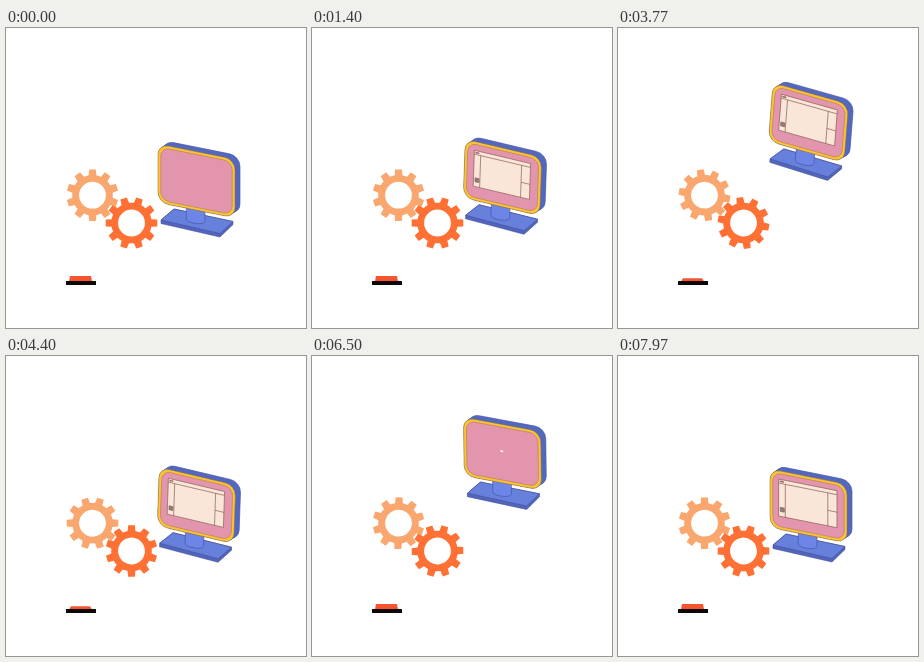
These frames come from a looping animation (300 by 300 pixels, 8000 ms). An HTML page:

```html
<!DOCTYPE html>
<html lang="en">
<head>
<meta charset="utf-8">
<title>Monitor and gears</title>
<style>
  html, body { margin: 0; width: 100%; height: 100%; overflow: hidden; background: #fff; }
  svg { display: block; width: 100vw; height: 100vh; }
</style>
</head>
<body>
<svg viewBox="0 0 300 300">
  <path id="lightGear" fill="#f9a76e" fill-rule="evenodd"/>
  <path id="darkGear" fill="#ff7034" fill-rule="evenodd"/>

  <path id="button" fill="#f5542f"/>
  <rect x="60" y="253" width="30" height="4" fill="#0c0805"/>

  <g id="monitor" stroke-linejoin="round">
    <g stroke="#46509a" stroke-width=".6">
      <path fill="#5065bb" d="M155 189L168 178L227 190.5V193.5L214 206L155 192.5Z"/>
      <path fill="#6780dc" d="M155 189L168 178L227 190.5L214 202.5Z"/>
      <path fill="#6c85e6" d="M180.3 170V188Q181 191.500 190 192.500Q198.500 193.500 199 190V174Z"/>
    </g>
    <g transform="matrix(1 .2 0 1 152 113)">
      <g id="shell" fill="#5368bf"></g>
      <rect width="77" height="58.500" rx="10.500" fill="#fcc52f" stroke="#8a6a4c" stroke-width=".5"/>
      <rect x="2.800" y="2.800" width="71.400" height="52.900" rx="8.500" fill="#e295ad" stroke="#b98262" stroke-width=".7"/>
      <g id="window" fill="none" stroke="#8d6257" stroke-width=".7">
        <rect x="-29.200" y="-18.500" width="58.400" height="37" fill="#fae6d9"/>
        <path d="M-29.200 -14.500H29.200M-22.500 -14.500V18.500M20 -14.500V18.500M20 3H29.200"/>
        <path d="M-28 -16.500h4" stroke-width="1.400"/>
        <rect x="-27.500" y="9.500" width="4" height="4" fill="#8d7f80"/>
      </g>
    </g>
  </g>
</svg>
<script>
const LOOP = 8000, JUMP = 3000;
const $ = id => document.getElementById(id);

// Rows: time, x, y, rotation
const pose = [
  [0, 0, 3, 0], [45, -1, 4, -7], [100, -2.7, 0, -16], [200, -3, -17, -14],
  [350, -1, -42, -6], [530, 0, -53, 0], [800, 0, -55.5, 5], [1000, 1, -57.5, 9],
  [1150, 1, -56, 10], [1270, 1, -46, 10], [1400, 0, -.5, 2], [1530, 0, -12, 0],
  [1670, 0, 0, 0], [2880, 0, 0, 0], [3000, 0, 3, 0]
];
const windowScale = [
  [0, 0], [450, 0], [800, 1], [1000, 1.02], [1400, .97], [1970, 1],
  [2470, 1], [2725, 1], [2770, .88], [2940, 0], [3000, 0]
];
const gearTurn = [[0, 0], [2400, 0], [3100, 2], [4400, 18], [5770, 29], [6900, 36], [8000, 36]];
const press = [[0, 0], [2700, 0], [3100, 1], [3900, 2.3], [4400, 2.3], [5200, .8], [5700, 0], [8000, 0]];

// Smooth interpolation that never overshoots its keys
function sample(keys, t, col = 1) {
  const last = keys.length - 1;
  let i = 0;
  while (i < last - 1 && t >= keys[i + 1][0]) i++;
  const slope = k => k < 0 || k >= last ? 0 :
    (keys[k + 1][col] - keys[k][col]) / (keys[k + 1][0] - keys[k][0]);
  const tangent = k => {
    const a = slope(k - 1), b = slope(k);
    return a * b > 0 ? 2 * a * b / (a + b) : 0;
  };
  const span = keys[i + 1][0] - keys[i][0];
  const u = (t - keys[i][0]) / span, v = 1 - u;
  return keys[i][col] * v * v * (1 + 2 * u) + keys[i + 1][col] * u * u * (3 - 2 * u)
    + span * u * v * (tangent(i) * v - tangent(i + 1) * u);
}

function gearPath(offset) {
  const root = 20.3, tip = 26, hole = 13.4, points = [];
  const add = (r, deg) => {
    const a = deg * Math.PI / 180;
    points.push((r * Math.cos(a)).toFixed(2) + ' ' + (r * Math.sin(a)).toFixed(2));
  };
  for (let k = 0; k < 10; k++) {
    const mid = k * 36 + offset;
    add(root, mid - 18);
    add(root, mid - 11);
    add(tip, mid - 7.5);
    add(tip, mid + 7.5);
    add(root, mid + 11);
  }
  return `M${points.join('L')}ZM${hole} 0A${hole} ${hole} 0 1 0 ${-hole} 0A${hole} ${hole} 0 1 0 ${hole} 0Z`;
}

function buildShell() {
  const steps = 8;
  let rects = '';
  for (let k = steps; k >= 0; k--) {
    const x = 5 * k / steps, y = -4.5 * k / steps;
    const edge = k === steps ? ' stroke="#46509a" stroke-width=".6"' : '';
    rects += `<rect x="${x}" y="${y}" width="77" height="58.5" rx="10.5"${edge}/>`;
  }
  $('shell').innerHTML = rects;
}

function draw(time) {
  const t = time % LOOP, phase = t % JUMP;
  const [x, y, turn] = [1, 2, 3].map(col => sample(pose, phase, col));
  $('monitor').setAttribute('transform', `translate(${x} ${y}) rotate(${turn} 190.5 150)`);

  const scale = sample(windowScale, phase);
  $('window').setAttribute('transform', `translate(37.8 26.8) scale(${scale})`);
  $('window').style.display = scale > .01 ? '' : 'none';

  const angle = sample(gearTurn, t);
  $('lightGear').setAttribute('transform', `translate(86.5 167.2) rotate(${-angle})`);
  $('darkGear').setAttribute('transform', `translate(125.5 195) rotate(${angle})`);

  const down = sample(press, t), inset = down * .4;
  $('button').setAttribute('d',
    `M63 253.500L${64 + inset} ${248 + down}H${85 - inset}L86 253.500Z`);
}

$('lightGear').setAttribute('d', gearPath(-90));
$('darkGear').setAttribute('d', gearPath(-72));
buildShell();

const start = performance.now();
function tick() {
  draw(performance.now() - start);
  requestAnimationFrame(tick);
}
draw(0);
requestAnimationFrame(tick);
</script>
</body>
</html>
```
